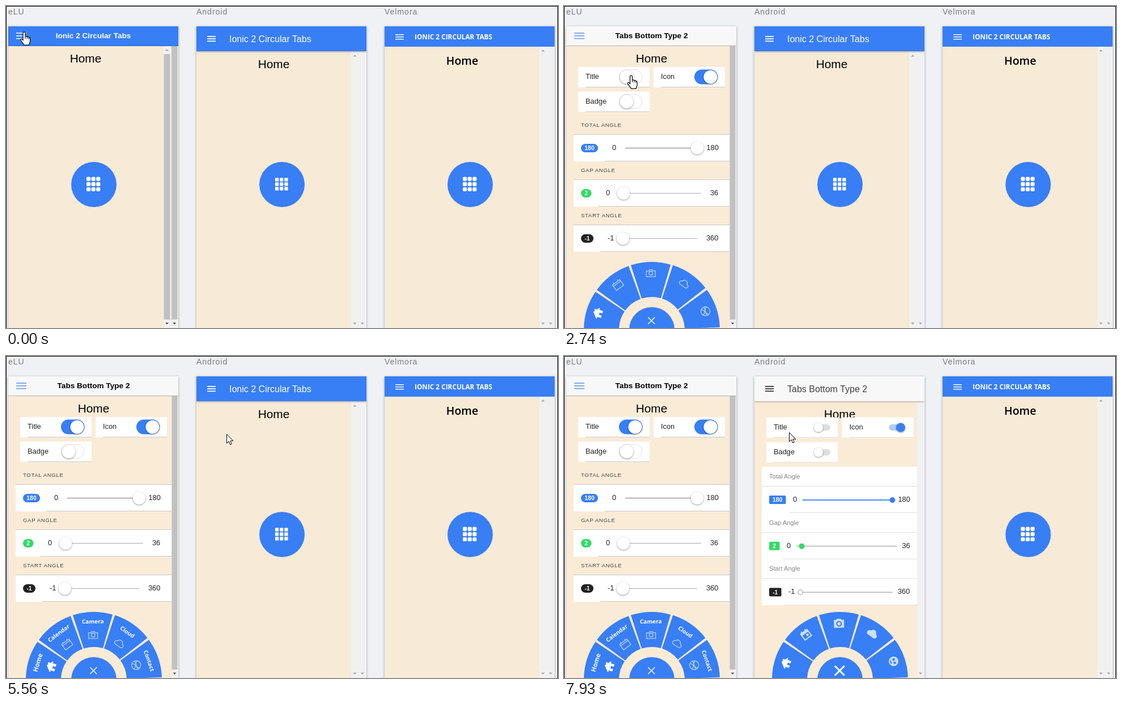
Recreate the animation shown at these times as an HTML page. Size 974 px wide and 570 px high, loop 8000 ms.

```html
<!DOCTYPE html>
<html lang="en">
<head>
<meta charset="utf-8">
<title>Circular tabs</title>
<style>
  html, body { margin: 0; width: 100%; height: 100%; overflow: hidden; background: #eff1f5; }
  svg { display: block; width: 974px; height: 570px; }
  text { font-family: "Liberation Sans", Arial, sans-serif; white-space: pre; }
  .semi text { font-family: "Open Sans", "Noto Sans", sans-serif; }
  .tab text { font-family: "Noto Sans", sans-serif; font-weight: 700; fill: #fff; }
  .panel { filter: drop-shadow(0 1px 2px #0005); }
  .lift { filter: drop-shadow(0 1.5px 1.5px #0006); }
  .bar { filter: drop-shadow(0 1.5px 1.5px #0005); }
</style>
</head>
<body>
<svg id="stage" viewBox="0 0 974 570"></svg>
<script>
const BLUE = '#387ef5', GREEN = '#32db64', DARK = '#222', CREAM = '#f7ead6', PAGE = '#faebd7', LINE = '#c8c7cc';
const LOOP = 8000, MENU = 243;

// Drawing helpers
const rect = (x, y, w, h, fill, more = '') => `<rect x="${x}" y="${y}" width="${w}" height="${h}" fill="${fill}" ${more}/>`;
const disc = (x, y, r, fill, more = '') => `<circle cx="${x}" cy="${y}" r="${r}" fill="${fill}" ${more}/>`;
const path = (d, fill = 'none', more = '') => `<path d="${d}" fill="${fill}" ${more}/>`;
const text = (x, y, size, str, fill = '#000', more = '') => `<text x="${x}" y="${y}" font-size="${size}" fill="${fill}" ${more}>${str}</text>`;
const group = (id, body, more = '') => `<g id="${id}" ${more}>${body}</g>`;
const at = (x, y, body, more = '') => `<g transform="translate(${x} ${y}) ${more}">${body}</g>`;
const MID = 'text-anchor="middle"', BOLD = 'font-weight="700"';

const burger = (x, y, w, step, color, thick) =>
  [0, 1, 2].map(i => rect(x, y + i * step, w, thick, color)).join('');
const scrollArrow = (x, y, up, color) => {
  const s = up ? -1 : 1;
  return path(`M${x - 3} ${y - 1.5 * s}h6l-3 ${3.2 * s}z`, color);
};
const scrollBar = (x, y, w, thumb, upArrow) =>
  rect(x, y, w, 570 - y, '#f1f1f1') +
  (thumb ? rect(x + .5, y + (upArrow ? 14 : 0), w - 2, 555 - y - (upArrow ? 14 : 0), '#c1c1c1') : '') +
  (upArrow ? scrollArrow(x + w / 2 - .5, y + 7, true, '#a3a3a3') : '') +
  scrollArrow(x + w / 2 - .5, 562, false, thumb ? '#505050' : '#a3a3a3');

function gridIcon(size, dx, dy, round) {
  let out = '';
  for (let i = 0; i < 9; i++)
    out += rect((i % 3 - 1) * dx - size / 2, (Math.floor(i / 3) - 1) * dy - size / 2, size, size, '#fff', `rx="${round}"`);
  return out;
}
const softGrid = gridIcon(7.2, 8.6, 9.2, 2), hardGrid = gridIcon(6.2, 8.2, 8, .3);
const homeButton = (x, grid) => disc(x, 316, 40, BLUE) + at(x - .8, 315.3, grid);

function sector(a0, a1, r0, r1) {
  const p = (a, r) => `${(r * Math.sin(a * Math.PI / 180)).toFixed(2)} ${(-r * Math.cos(a * Math.PI / 180)).toFixed(2)}`;
  return `M${p(a0, r1)}A${r1} ${r1} 0 0 1 ${p(a1, r1)}L${p(a1, r0)}A${r0} ${r0} 0 0 0 ${p(a0, r0)}Z`;
}

const house = path('M-10 .5L0-8 3-5.5V-7H6V-3L10 .5 8.5 2 6.5.5V8H2V3H-2V8H-6.5V.5L-8.5 2Z', '#fff');
const outline = d => path(d, 'none', 'stroke="#fff" stroke-width="1.2" opacity=".7"');
const filled = d => path(d, '#fff', 'fill-rule="evenodd" opacity=".75"');
const ring = r => `M${-r} 0a${r} ${r} 0 1 0 ${2 * r} 0a${r} ${r} 0 1 0 ${-2 * r} 0z`;
const cloud = 'M-5 5.5C-10 5-9-1-5-1.5-4-7 4-7 5-1 10-1 10 5 5 5.5Z';
const lineIcons = [house,
  outline('M-8-5H8V7H-8ZM-8-2H8M-4.5-7.5V-5M4.5-7.5V-5'),
  outline('M-8-4H-4L-2.5-6H2.5L4-4H8V6H-8Z' + ring(3.3)),
  outline(cloud),
  outline(ring(8) + 'M-7-4Q0 5 7-4M-5 6Q0-3 5 6M-8 0H8')];
const solidIcons = [house,
  filled('M-8-7H-5V-9H-3V-7H3V-9H5V-7H8V8H-8ZM-6-2H6V6H-6ZM0 0H4V4H0Z'),
  filled('M-9-6H-5L-3-8H3L5-6H9V8H-9ZM-5 1a5 5 0 1 0 10 0a5 5 0 1 0-10 0ZM-3 1a3 3 0 1 1 6 0a3 3 0 1 1-6 0Z'),
  filled('M-6 6C-12 5-10-3-5-3-3-9 5-8 6-2 11-2 11 6 6 6Z'),
  filled(ring(8.5) + 'M-5-3h4v4h-4zM1-3h4v4H1zM-3 4h6v2h-6z')];
const tabNames = ['Home', 'Calendar', 'Camera', 'Cloud', 'Contact'];

function wheel(id, x, icons, cross) {
  const tabs = tabNames.map((name, i) => {
    const angle = -73 + 36 * i;
    return `<g class="tab">${path(sector(angle - 17, angle + 17, 58, 120), BLUE)}
      <g transform="rotate(${angle})">
        <g class="${id}Icon" transform="translate(0 -100)">${icons[i]}</g>
        <text class="${id}Name" y="-99.5" font-size="${i ? 10 : 11.3}" ${MID} display="none">${name}</text>
      </g></g>`;
  }).join('');
  return at(x, 573, group(id + 'Ring', tabs) + disc(0, 0, 40, BLUE) +
    group(id + 'Cross', path(cross.d, 'none', `stroke="#fff" stroke-width="${cross.w}"`), 'transform="translate(-.7 -16)"') +
    group(id + 'Grid', softGrid, 'transform="translate(-.7 -16) scale(.85)" display="none"'));
}

const menuItem = (x, y, str) => text(x, y, 12.8, str);

// First phone
const homeA = rect(4, 70, 300, 500, CREAM) + rect(4, 36, 300, 35, BLUE) + rect(4, 70, 300, 1, '#2468d8') +
  group('burgerA', burger(18, 47.3, 18, 4.8, '#fff', 1.5)) +
  text(154, 57, 13.6, 'Ionic 2 Circular Tabs', '#fff', MID + BOLD.padStart(BOLD.length + 1)) +
  text(140.5, 100, 20.8, 'Home', '#000', MID) + scrollBar(278, 71, 13, true, true) +
  scrollBar(291.5, 71, 12.5, true, false) + homeButton(155, softGrid);

const menuA = rect(4, 36, MENU, 534, '#fff') + rect(4, 36, MENU, 34, '#f8f8f8') + rect(4, 70, MENU, 1, '#b2b2b2') +
  text(126, 57, 13.6, 'Tab Types', '#000', `${MID} ${BOLD}`) +
  group('itemA', rect(4, 106, 231, 36, '#d9d9d9'), 'display="none"') +
  menuItem(17, 92, 'Tabs Bottom') + menuItem(17, 128, 'Tabs Bottom Type 2') +
  rect(17, 105, 218, 1, LINE) + rect(4, 141, 231, 1, LINE) +
  [88.5, 124.5].map(y => path(`M214 ${y - 5}l5.5 5-5.5 5`, 'none', `stroke="${LINE}" stroke-width="1.4"`)).join('') +
  scrollBar(235, 71, 12, true, true);

function toggleCard(x, y, label, id, on) {
  const tx = x + 72.5, ty = y + 5;
  return rect(x, y, 126, 36, '#fff') + rect(x + 13, y + 35, 113, 1, LINE) + text(x + 13, y + 21, 12.8, label, '#222') +
    rect(tx, ty, 40.5, 25, '#fff', 'rx="12.5" stroke="#e0e0e0"') +
    rect(tx - .5, ty - .5, 41.5, 26, BLUE, `rx="13" id="${id}Fill" opacity="${+on}"`) +
    `<g id="${id}Knob" transform="translate(${on ? 15 : 0})">${disc(tx + 13, ty + 12.7, 12, '#fff', 'class="lift"')}</g>`;
}

function rangeA(y, label, badge, color, bw, min, minX, from, to, knob, max, maxX) {
  return text(30, y - 13, 9.6, label, '#444', 'letter-spacing=".65"') +
    rect(17, y, 275, 48, '#fff') + rect(17, y, 275, 1, LINE) + rect(42 + bw, y + 47, 250 - bw, 1, LINE) +
    rect(30, y + 17, bw, 15, color, 'rx="7.5"') +
    text(30 + bw / 2, y + 28.3, 10.4, badge, '#fff', `${MID} ${BOLD}`) +
    text(minX, y + 28, 12.8, min, '#222') + rect(from, y + 24, to - from, 1, knob > 200 ? '#777' : '#aaa') +
    disc(knob, y + 24.5, 11.2, '#fff', 'class="lift"') + text(maxX, y + 28, 12.8, max, '#222');
}

const tabsA = rect(4, 70, 300, 500, PAGE) + rect(4, 36, 300, 34, '#f8f8f8') + rect(4, 70, 300, 1, '#b2b2b2') +
  burger(18, 47.3, 18, 4.8, '#5b95f6', 1.5) +
  text(154.5, 57, 13.6, 'Tabs Bottom Type 2', '#000', `${MID} ${BOLD}`) + text(154.5, 100, 20.8, 'Home', '#000', MID) +
  toggleCard(25, 108, 'Title', 'title', false) + toggleCard(158, 108, 'Icon', 'icon', true) + toggleCard(25, 151.5, 'Badge', 'badge', false) +
  rangeA(227, 'TOTAL ANGLE', '180', BLUE, 30, '0', 85, 108, 235, 235, '180', 251.5) +
  rangeA(307, 'GAP ANGLE', '2', GREEN, 18.5, '0', 74, 105, 242, 105, '36', 258) +
  rangeA(387, 'START ANGLE', '-1', DARK, 22, '-1', 77, 104, 235, 104, '360', 251) +
  wheel('a', 155, lineIcons, { d: 'M-6-6L6 6M6-6L-6 6', w: 1.5 }) +
  group('scrollA', scrollBar(292, 71, 12, true, false), 'display="none"');

let spokes = '';
for (let i = 0; i < 12; i++)
  spokes += `<path d="M0-5V-10" stroke="#555" stroke-width="1.5" opacity="${.15 + i * .05}" transform="rotate(${i * 30})"/>`;
const loadingA = rect(4, 36, 300, 534, '#000', 'opacity=".27"') + rect(82, 271, 145, 62, '#f2f1ef', 'rx="6" opacity=".85"') +
  at(120, 301, group('spinA', spokes)) + text(143, 306.5, 11.2, 'Loading ...', '#444', BOLD);

// Second phone
const homeB = rect(336, 36, 300, 534, CREAM) + scrollBar(609, 81, 14, false, true) + scrollBar(623, 81, 13, false, false) +
  text(472.5, 110, 20.8, 'Home', '#000', MID) + rect(336, 36, 300, 44, BLUE, 'class="bar"') +
  burger(355, 53, 15, 4.2, '#fff', 1.8) + text(394, 63.5, 16, 'Ionic 2 Circular Tabs', '#fff') + homeButton(487, hardGrid);

function cardB(x, y, label, on) {
  const tx = x + (on ? 83 : 85);
  return rect(x, y, 126, 36, '#fff') + rect(x + 13, y + 35, 113, 1, '#dedede') + text(x + 13, y + 21.5, 12.8, label, '#222') +
    rect(tx, y + 12.5, 28, 11, on ? '#afcbfb' : '#dedede', 'rx="5.5"') +
    disc(tx + (on ? 20.5 : 7), y + 18, 8, on ? BLUE : '#fff', 'class="lift"');
}

function rangeB(y, label, badge, color, bw, min, minX, from, to, knob, max, maxX) {
  const full = knob > 500, hollow = color === DARK;
  return text(362, y + 21, 11.2, label, '#858585') + rect(349, y + 34, 274, 1, '#dedede') +
    rect(368 + bw, y + 81, 255 - bw, 1, '#dedede') + rect(362, y + 51, bw, 15, color, 'rx="2"') +
    text(362 + bw / 2, y + 62.3, 10.4, badge, '#fff', `${MID} ${BOLD}`) + text(minX, y + 62, 12.8, min, '#222') +
    rect(from, y + 58, to - from, 1.8, full ? BLUE : '#bdbdbd') +
    disc(knob, y + 59, hollow ? 4.2 : 5, hollow ? '#fff' : color, hollow ? 'stroke="#aaa" stroke-width="1.3"' : '') +
    text(maxX, y + 62, 12.8, max, '#222');
}

const tabsB = rect(336, 36, 300, 534, PAGE) + rect(623, 81, 13, 489, '#f1f1f1') + scrollArrow(629, 562, false, '#a3a3a3') +
  text(486.5, 110, 20.8, 'Home', '#000', MID) + rect(336, 36, 300, 44, '#f8f8f8', 'class="bar"') +
  burger(355, 53, 15, 4.2, '#333', 1.8) + text(394, 63.5, 16, 'Tabs Bottom Type 2', '#424242') +
  cardB(357, 108.5, 'Title', false) + cardB(490.5, 108.5, 'Icon', true) + cardB(357, 152.5, 'Badge', false) +
  rect(349, 196, 274, 245, '#fff') +
  rangeB(196, 'Total Angle', '180', BLUE, 29.5, '0', 404, 421, 580, 579.5, '180', 589.5) +
  rangeB(277.7, 'Gap Angle', '2', GREEN, 18.5, '0', 393, 410, 587, 419.5, '36', 596.5) +
  rangeB(359.4, 'Start Angle', '-1', DARK, 21.5, '-1', 396, 417, 580, 417, '360', 589) +
  wheel('b', 487, solidIcons, { d: 'M-8.5-8.5L8.5 8.5M8.5-8.5L-8.5 8.5', w: 3 });

const menuB = rect(336, 36, MENU, 534, '#fff', 'class="bar"') +
  rect(336, 36, MENU, 44, '#f8f8f8', 'class="bar"') + text(458, 64, 16, 'Tab Types', '#424242', MID) +
  `<clipPath id="rowB">${rect(336, 117, 229, 36, '#000')}</clipPath>` +
  `<g clip-path="url(#rowB)">${disc(400, 135, 0, '#000', 'id="ripple" opacity=".08"')}</g>` +
  menuItem(349, 103, 'Tabs Bottom') + menuItem(349, 139, 'Tabs Bottom Type 2') +
  rect(349, 116, 216, 1, '#dedede') + rect(336, 152, 229, 1, '#dedede') + scrollBar(565, 81, 14, false, true);

const loadingB = rect(336, 36, 300, 534, '#000', 'opacity=".3"') + rect(410, 268, 153, 68, '#fafafa', 'rx="2" class="lift"') +
  at(444, 302, group('spinB', path('M0-10A10 10 0 1 1-10 0', 'none', `stroke="${BLUE}" stroke-width="2.5"`))) +
  text(473, 306, 11.2, 'Loading ...', '#555');

// Third phone
const homeC = rect(668, 36, 300, 534, CREAM) + scrollBar(941, 72, 14, false, true) + scrollBar(955, 72, 13, false, false) +
  rect(668, 36, 300, 36, BLUE) + burger(687, 50, 15, 4, '#fff', 1.5) +
  `<g class="semi">${text(721, 59, 11.8, 'IONIC 2 CIRCULAR TABS', '#fff', BOLD)}${text(805, 104, 19.5, 'Home', '#000', `${MID} font-weight="600"`)}</g>` +
  homeButton(819, softGrid);

const phones = [
  ['eLU', 4, group('menuA', menuA) + group('pageA', group('homeA', homeA) + group('tabsA', tabsA)) + group('loadA', loadingA)],
  ['Android', 336, group('homeB', homeB) + group('tabsB', tabsB) + group('shadeB', rect(336, 36, 300, 534, '#000')) +
    group('menuB', menuB) + group('loadB', loadingB)],
  ['Velmora', 668, homeC]];

const stage = document.getElementById('stage');
stage.innerHTML = rect(0, 0, 974, 570, '#eff1f5') + phones.map(([name, x, body], i) =>
  text(x, 15, 14, name, '#757a82', 'letter-spacing="1"') + rect(x, 36, 300, 540, CREAM, 'class="panel"') +
  `<clipPath id="clip${i}">${rect(x, 36, 300, 534, '#000')}</clipPath><g clip-path="url(#clip${i})">${body}</g>`).join('') +
  path('M.5 570V.5H973.5V570', 'none', 'stroke="#000"') +
  group('cursor',
    group('hand', path('M-2 2Q-2 0 0 0T2 2V8q2-1 3.4.6 2-.6 3 1 2-.2 2.2 1.8V17L8.5 23H0L-6 14.5q-.6-2.8 2.2-2L-2 14.5Z', '#fff', 'stroke="#000" stroke-width="1.2"') +
      path('M2 8v4M5.4 9v3.5M8.3 10v3', 'none', 'stroke="#000"')) +
    group('pointer', path('M0 0V16L3.7 12.6 6.2 18.4 8.7 17.3 6.2 11.7H11.3Z', '#fff', 'stroke="#000"')));

// Motion
const $ = id => document.getElementById(id);
const set = (id, name, value) => $(id).setAttribute(name, value);
const show = (id, on) => set(id, 'display', on ? 'inline' : 'none');
const easeOut = p => 1 - (1 - p) ** 3;
const smooth = p => p * p * (3 - 2 * p);

function track(t, steps, ease = smooth) {
  const i = steps.findIndex(s => s[0] > t);
  if (i === 0) return steps[0][1];
  if (i < 0) return steps[steps.length - 1][1];
  const [t0, v0] = steps[i - 1], [t1, v1] = steps[i];
  return v0 + (v1 - v0) * ease((t - t0) / (t1 - t0));
}

// time, x, y
const route = [[0, 32, 46], [620, 32, 46], [970, 67, 83], [1200, 72, 119], [1500, 72, 119], [1960, 86.5, 136.5], [2120, 98, 150],
  [2400, 110, 158], [2800, 119, 121], [3080, 119, 121], [3700, 172, 538], [3820, 169, 543], [3880, 167, 543],
  [5180, 167, 543], [5560, 389.5, 138.5], [5850, 364, 63], [6330, 364, 63], [6520, 372.5, 77.5], [6840, 384, 138],
  [7450, 384, 138], [7900, 397.5, 135.5]];
const routeX = route.map(([t, x]) => [t, x]), routeY = route.map(([t, , y]) => [t, y]);
// spans where the pointer is an arrow
const arrowSpans = [[1500, 2200], [5230, 5780], [6420, 6640], [7450, LOOP]];

function render(t) {
  const openA = track(t, [[520, 0], [820, 1], [1330, 1], [1630, 0]], easeOut);
  show('menuA', openA > 0);
  show('itemA', t >= 1330 && t < 1630);
  set('pageA', 'transform', `translate(${MENU * openA})`);
  set('burgerA', 'opacity', t >= 250 && t < 520 ? .45 : 1);
  show('homeA', t < 1480);
  show('tabsA', t >= 1480);
  show('scrollA', t >= 2110);
  set('loadA', 'opacity', track(t, [[1500, 0], [1680, 1], [1950, 1], [2110, 0]]));
  set('spinA', 'transform', `rotate(${Math.floor(t / 83) * 30})`);

  const titled = track(t, [[2950, 0], [3250, 1]]);
  set('titleFill', 'opacity', titled);
  set('titleKnob', 'transform', `translate(${15 * titled})`);
  const named = t >= 2980;
  document.querySelectorAll('.aName').forEach(e => e.setAttribute('display', named ? 'inline' : 'none'));
  document.querySelectorAll('.aIcon').forEach(e => e.setAttribute('transform', `translate(0 ${named ? -79 : -100})`));

  const spread = track(t, [[4030, 1], [4330, 0], [4750, 0], [5050, 1]], easeOut);
  set('aRing', 'transform', `scale(${.1 + .9 * spread})`);
  set('aRing', 'opacity', spread);
  const closed = t >= 4030 && t < 4750;
  show('aCross', !closed);
  show('aGrid', closed);

  const openB = track(t, [[6100, 0], [6400, 1], [7270, 1], [7550, 0]], easeOut);
  show('menuB', openB > 0);
  set('menuB', 'transform', `translate(${(openB - 1) * (MENU + 4)})`);
  set('shadeB', 'opacity', .35 * openB);
  set('ripple', 'r', t < 7060 ? 0 : track(t, [[7060, 40], [7120, 160]]));
  show('homeB', t < 7400);
  show('tabsB', t >= 7400);
  set('loadB', 'opacity', track(t, [[7420, 0], [7580, 1], [7760, 1], [7900, 0]]));
  set('spinB', 'transform', `rotate(${t * .5})`);

  const arrow = arrowSpans.some(([from, to]) => t >= from && t < to);
  set('cursor', 'transform', `translate(${track(t, routeX).toFixed(1)} ${track(t, routeY).toFixed(1)})`);
  show('hand', !arrow);
  show('pointer', arrow);
}

const start = performance.now();
function tick() {
  render((performance.now() - start) % LOOP);
  requestAnimationFrame(tick);
}
tick();
</script>
</body>
</html>
```
